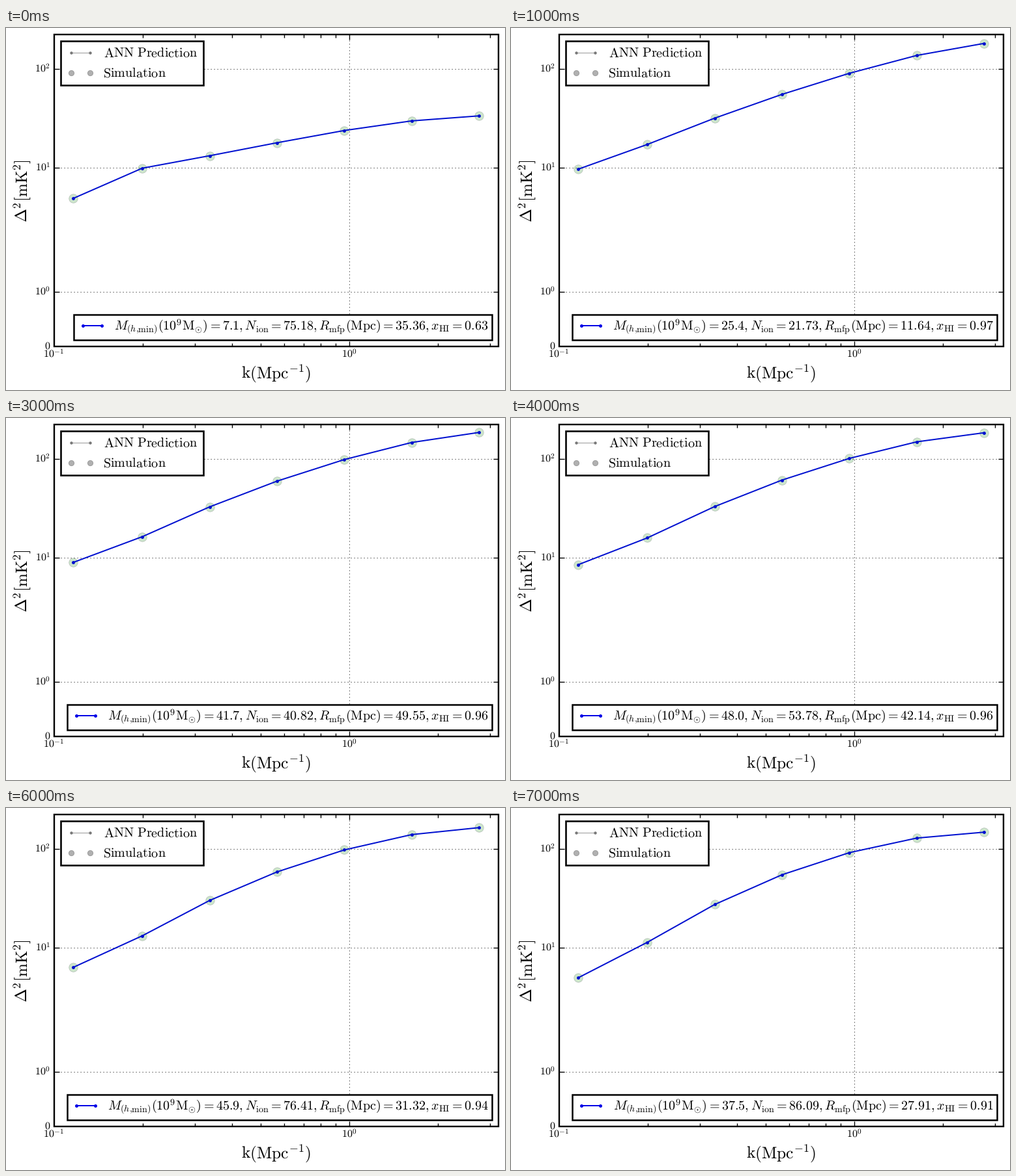
Write a matplotlib script that moves like this. It is 766 px wide and 557 px high and loops after 8000 ms.

```python
import math

import matplotlib.pyplot as plt
import numpy as np
from matplotlib.animation import FuncAnimation
from matplotlib.patches import Rectangle

W, H, DPI = 766, 557, 64
PX = 72 / DPI  # points per pixel
LEFT, RIGHT, TOP, BOTTOM = 74, 756, 10, 490
DECADE = 453
BLUE, LEGEND_BLUE = "#0010d0", "#0000e6"
STEPS = 8

POINT_X = np.array([103] + [209 + 103.4 * i for i in range(6)])

# Sampled models; the seconds in between are interpolated.
# second, mass, ions, free path, neutral, first y, last y, early and late bend
KEYS = np.array([
    (0, 7.1, 75.18, 35.36, 0.63, 262, 135, 2.50, 1.56),
    (1, 25.4, 21.73, 11.64, 0.97, 217, 23.5, 1.20, 1.31),
    (2, 8.0, 53.64, 15.64, 0.76, 318.5, 92, 2.19, 1.83),
    (3, 41.7, 40.82, 49.55, 0.96, 222, 22, 1.21, 1.43),
    (5, 54.2, 66.73, 34.73, 0.96, 229, 23, 1.28, 1.56),
    (7, 37.5, 86.09, 27.91, 0.91, 261, 37, 1.53, 1.79),
])

plt.rcParams["mathtext.fontset"] = "cm"
plt.rcParams["text.hinting"] = "none"

fig = plt.figure(figsize=(W / DPI, H / DPI), dpi=DPI, facecolor="white")
ax = fig.add_axes([0, 0, 1, 1])
ax.set_xlim(0, W)
ax.set_ylim(H, 0)
ax.axis("off")


def stroke(xs, ys, width, color="black", z=3, **kw):
    return ax.plot(xs, ys, color=color, lw=width * PX, zorder=z, **kw)[0]


def dots(xs, ys, size, color, z=4, edge=0, **kw):
    return ax.plot(xs, ys, "o", ms=size * PX, mfc=color, mec="black",
                   mew=edge * PX, zorder=z, **kw)[0]


def label(x, y, tex, size, ha="center", z=8, **kw):
    return ax.text(x, y, f"${tex}$", fontsize=size * PX, ha=ha,
                   va="baseline", zorder=z, **kw)


def frame(x0, y0, x1, y1, width, z, face="white"):
    box = Rectangle((x0, y0), x1 - x0, y1 - y0, fc=face, ec="black",
                    lw=width * PX, zorder=z, joinstyle="miter")
    return ax.add_patch(box)


def power(exponent):
    return rf"\mathrm{{10}}^{{\mathrm{{{exponent}}}}}"


def ticks_x(x, length):
    for edge, step in ((TOP, length), (BOTTOM, -length)):
        stroke([x, x], [edge, edge + step], 1.4, solid_capstyle="butt")


def symlog_y(value):
    # Linear up to 2, logarithmic above
    decade = 152
    linear = decade / 0.9
    if value <= 2:
        return BOTTOM - linear * value / 2
    return BOTTOM - linear - decade * math.log10(value / 2)


def draw_axes():
    grid = dict(linestyle=(0, (1.5625, 4.6875)), dash_capstyle="butt", z=1)
    one = LEFT + DECADE
    stroke([one, one], [BOTTOM, TOP], 0.8, **grid)
    ticks_x(one, 8)
    for k in [n / 10 for n in range(2, 10)] + [2, 3]:
        ticks_x(one + DECADE * math.log10(k), 5)

    for exponent in range(3):
        y = round(symlog_y(10 ** exponent))
        stroke([LEFT, RIGHT], [y, y], 0.8, **grid)
        for edge, step in ((LEFT, 8), (RIGHT, -8)):
            stroke([edge, edge + step], [y, y], 1.4, solid_capstyle="butt")
        label(68, y + 5, power(exponent), 16, "right")

    label(68, 495, r"\mathrm{0}", 16, "right")
    label(73, 507, power(-1), 16)
    label(one, 507, power(0), 16)
    label(414.5, 540, r"\mathrm{k(Mpc}^{\mathrm{-1}}\mathrm{)}", 25.5)
    label(33, 299, r"\Delta^{\mathrm{2}}\mathrm{[mK}^{\mathrm{2}}\mathrm{]}",
          25, "left", rotation=90, rotation_mode="anchor")
    frame(LEFT, TOP, RIGHT, BOTTOM, 2.4, 5, "none")


def draw_key():
    frame(84, 20, 303, 88, 2.6, 6)
    ends = [99.5, 128.5]
    stroke(ends, [38, 38], 1.3, "#ababab", 7)
    dots(ends, [38, 38], 4.4, "#777777", 8)
    dots(ends, [69, 69], 8.4, "black", 8, 0.7, alpha=0.31)
    label(150, 45, r"\mathrm{ANN\ Prediction}", 20.2, "left")
    label(149, 76, r"\mathrm{Simulation}", 20.2, "left")


def params_tex(mass, ions, path, neutral):
    parts = (
        (r"M_{(h{,}\mathrm{min})}\mathrm{(10}^{\mathrm{9}}"
         r"\mathrm{M}_{\odot}\mathrm{)}", f"{mass:.1f}"),
        (r"N_{\mathrm{ion}}", f"{ions:.2f}"),
        (r"R_{\mathrm{mfp}}\mathrm{(Mpc)}", f"{path:.2f}"),
        (r"x_{\mathrm{HI}}", f"{neutral:.2f}"),
    )
    return ",".join(rf"{name}=\mathrm{{{value}}}" for name, value in parts)


def spectrum(first, last, early, late):
    # Ease-out whose exponent settles from early to late along the curve
    i = np.arange(len(POINT_X))
    bend = late + (early - late) * 0.25 ** (i - 1.0)
    return last + (first - last) * (1 - i / i[-1]) ** bend


draw_axes()
draw_key()

simulated = dots([], [], 13.6, "green", 2, 0.7, alpha=0.2)
curve = stroke([], [], 2, BLUE, 3)
curve_dots = dots([], [], 5, BLUE)
box = frame(104, 441, 746, 480, 2.5, 6)
handle = stroke([], [], 2, LEGEND_BLUE, 7)
handle_dots = dots([], [], 5, LEGEND_BLUE, 8)
caption = label(0, 464, "x", 20.1)


def update(second):
    values = [np.interp(second, KEYS[:, 0], col) for col in KEYS.T[1:]]
    params, shape = values[:4], values[4:]
    ys = spectrum(*shape)
    for part in (simulated, curve, curve_dots):
        part.set_data(POINT_X + 0.2, ys + 0.2)

    # The legend grows leftwards by one digit for two-digit masses
    left = 94 if params[0] >= 10 else 104
    box.set_x(left)
    box.set_width(746 - left)
    for part in (handle, handle_dots):
        part.set_data([left + 14.3, left + 42.8], [458, 458])
    caption.set_text(f"${params_tex(*params)}$")
    caption.set_x((left + 64 + 739) / 2)
    return simulated, curve, curve_dots, box, handle, handle_dots, caption


anim = FuncAnimation(fig, update, frames=STEPS, interval=1000,
                     repeat=True, repeat_delay=0, blit=False)
plt.show()
```
